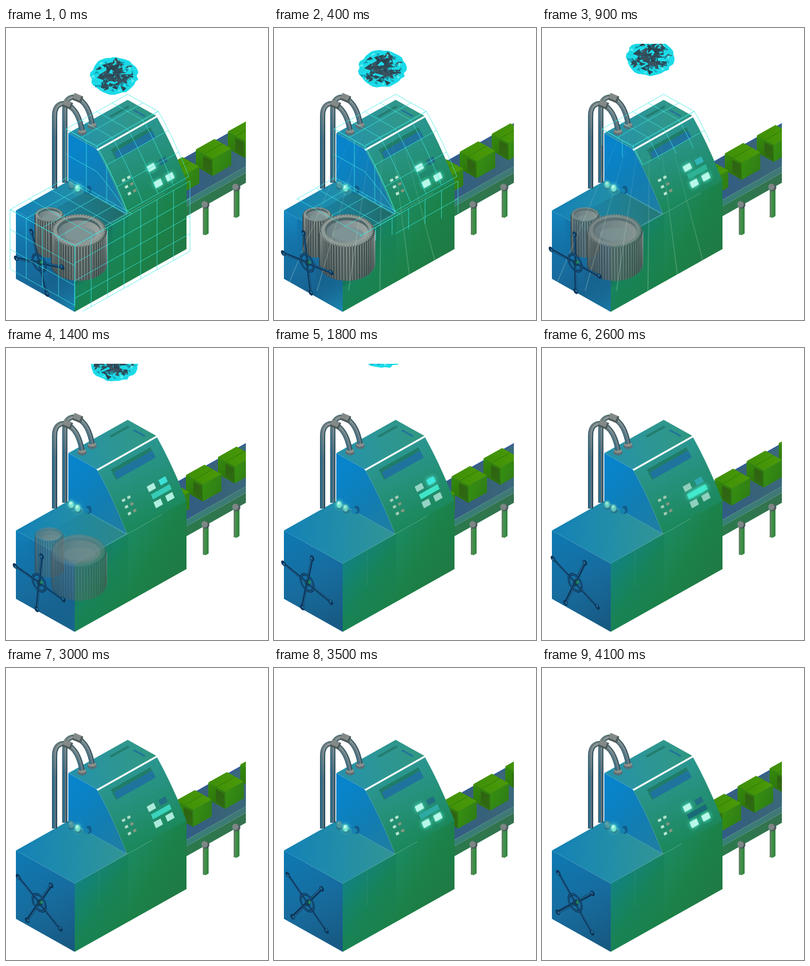
An HTML page with a canvas that plays this animation: 450x500 px, repeating every 4.2 s.

```html
<!DOCTYPE html>
<html>
<head>
<meta charset="utf-8">
<style>
html, body { margin: 0; width: 100%; height: 100%; overflow: hidden; background: #fff; }
canvas { display: block; }
</style>
</head>
<body>
<canvas id="stage" width="450" height="500"></canvas>
<script>
const c = document.getElementById('stage').getContext('2d');
const LOOP = 4200, STEP = 100;
const { PI, sin, cos, min, max } = Math;

// Isometric space: x runs right, y runs left, z up from the front corner
const p = (x, y, z) => [118 + x - y, 369 - .56 * (x + y) - z];
// Side profile of the cabinet: curved front, flat top
const height = y => min(82, y * (1.95 - .0072 * y));
const skin = (x, y) => p(x, y, height(y));

const ramp = (t, from, to) => max(0, min(1, (t - from) / (to - from)));
const range = (n, f) => Array.from({ length: n }, (_, i) => f(i));

// Piecewise linear value through time/value pairs
function at(t, ...k) {
  let v = k[1];
  for (let i = 2; i < k.length; i += 2) v += (k[i + 1] - k[i - 1]) * ramp(t, k[i - 2], k[i]);
  return v;
}

function random(seed) {
  return () => (seed = seed * 16807 % 2147483647) / 2147483647;
}

function grad(a, b, colors) {
  const g = c.createLinearGradient(...a, ...b);
  colors.forEach((col, i) => g.addColorStop(i / (colors.length - 1), col));
  return g;
}

function trace(pts) {
  c.beginPath();
  pts.forEach(q => c.lineTo(...q));
}
function fill(pts, color) {
  trace(pts);
  c.fillStyle = color;
  c.fill();
}
function line(pts, color, width = 1) {
  trace(pts);
  c.strokeStyle = color;
  c.lineWidth = width;
  c.stroke();
}
function oval(x, y, rx, ry, color) {
  c.beginPath();
  c.ellipse(x, y, rx, ry, 0, 0, 2 * PI);
  c.fillStyle = color;
  c.fill();
}
function saved(draw) {
  c.save();
  draw();
  c.restore();
}

// Quad shaded from its first corner to the opposite one
const face = (pts, colors) => fill(pts, grad(pts[0], pts[2], colors));
const leftFace = (x, y0, y1, z0, z1, colors) =>
  face([p(x, y1, z1), p(x, y0, z1), p(x, y0, z0), p(x, y1, z0)], colors);
const rightFace = (y, x0, x1, z0, z1, colors) =>
  face([p(x0, y, z1), p(x1, y, z1), p(x1, y, z0), p(x0, y, z0)], colors);
const topFace = (z, x0, x1, y0, y1, colors) =>
  face([p(x0, y1, z), p(x1, y1, z), p(x1, y0, z), p(x0, y0, z)], colors);

// Rectangle lying on the cabinet skin
const patch = (x0, x1, y0, y1, color) =>
  fill([skin(x0, y1), skin(x1, y1), skin(x1, y0), skin(x0, y0)], color);

function carton(x) {
  leftFace(x, 0, 29, -17, 12, ['#348b0c', '#2b6c0b']);
  rightFace(0, x, x + 32, -17, 12, ['#368f10', '#2f7d16']);
  topFace(12, x, x + 32, 0, 29, ['#3f8f08', '#4a9a08']);
  leftFace(x, 2, 16, -14, 8, ['#2f6212', '#2f6a12']);
  line([p(x, 15, 12), p(x + 32, 15, 12)], '#2f7a06');
}

function leg(x) {
  const [px, py] = p(x, -14, -43);
  fill([[px - 3, py], [px + 7, py], [px + 7, py + 49], [px + 2, py + 52], [px - 3, py + 51]],
    grad([px - 3, py], [px + 7, py], ['#66806a', '#3e9146', '#2f8140']));
  oval(px + 2, py, 6.5, 6.5, '#4b5b5c');
  oval(px, py - 1, 5.5, 5.5, '#7c8784');
}

function conveyor(d) {
  saved(() => {
    c.beginPath();
    c.rect(0, 0, 412, 500);
    c.clip();
    topFace(-17, 170, 360, -14, 52, ['#2c5791', '#386278', '#3f7482']);
    line([p(170, 51, -17), p(360, 51, -17)], '#335c9c', 2);
    rightFace(-14, 170, 300, -28, -17, ['#368076', '#427675']);
    rightFace(-14, 170, 300, -45, -28, ['#2a7a4c', '#35704f']);
    for (let i = 2; i >= -1; i--) carton(237 - d + 55 * i);
    [209, 262].forEach(leg);
  });
}

function machine() {
  const profile = range(35, i => 101 - i * 101 / 34);
  leftFace(0, 0, 101, -117, 0, ['#0d7ab3', '#176c9e', '#17567e']);
  rightFace(0, 0, 92, -117, 0, ['#118381', '#188358', '#1b8149']);
  rightFace(0, 92, 192, -117, 0, ['#1c8a62', '#1b8148', '#207944']);
  topFace(0, 0, 90, 0, 101, ['#1381b7', '#218da9', '#329594']);
  fill([p(90, 101, 0), ...profile.map(y => skin(90, y))], grad(p(90, 101, 40), p(90, 0, 0), ['#0784cb', '#127db2', '#217f9f']));
  topFace(82, 90, 192, 52, 101, ['#2491ae', '#2d9695', '#319781']);
  const curve = profile.filter(y => y < 53);
  fill([...curve.map(y => skin(90, y)), ...curve.reverse().map(y => skin(192, y))],
    grad([200, 180], [255, 292], ['#2b9692', '#259078', '#1b885b']));
  line([p(42, 0, 0), p(42, 0, -62)], 'rgba(66,160,112,.4)');
  // Hatch, display slot and a dent at the cabinet foot
  patch(151, 183, 88, 92, '#237d70');
  patch(180, 183, 61, 80, '#22749a');
  patch(108, 176, 37, 46, '#1f7c68');
  patch(110, 176, 37, 43, '#1f749e');
  oval(142, 277, 5, 7, '#125c8b');
  oval(138, 279, 5, 5, '#1682ae');
}

function pipe(x, y, bottom) {
  const path = new Path2D(`M${x} ${bottom}V${y + 20}C${x} ${y - 4} ${x + 20} ${y - 5} ${x + 30} ${y + 7}Q${x + 42} ${y + 18} ${x + 47} ${y + 45}`);
  const tint = (a, b) => grad([x, y], [x, y + 60], [a, b]);
  oval(x + 47, y + 49, 8, 5, '#596f75');
  oval(x + 47, y + 46, 7, 4, '#8b8f8b');
  [[tint('#3e626c', '#2c4a58'), 9, 0], [tint('#6d7d80', '#2f6e8c'), 6, -.5], [tint('#9a9d98', '#667379'), 2, 1]]
    .forEach(([color, width, shift]) => saved(() => {
      c.translate(shift, 0);
      c.strokeStyle = color;
      c.lineWidth = width;
      c.stroke(path);
    }));
  saved(() => {
    c.translate(x + 22, y + 1);
    c.rotate(.4);
    c.fillStyle = '#4b5758';
    c.fillRect(-8, -6, 16, 12);
    c.fillStyle = '#838a87';
    c.fillRect(-8, -6, 13, 9);
  });
}

function key(x, y, w, h, level, on, off) {
  const area = [x - w, x + w, y - h, y + h];
  patch(...area, off);
  saved(() => {
    c.globalAlpha = level;
    c.shadowColor = '#5affea';
    c.shadowBlur = level > .95 ? 7 : 0;
    patch(...area, on);
  });
}

function bulb(x, y, level) {
  oval(x + 1, y + 5, 6, 4, '#246f87');
  oval(x, y, 5, 6.5, '#417f91');
  saved(() => {
    c.globalAlpha = level;
    c.shadowColor = '#6fffdc';
    c.shadowBlur = 8 * level;
    oval(x, y, 4.5, 6, '#79e5d3');
    oval(x - 1, y - 2, 2, 2.5, '#d0fff3');
  });
}

function lights(t) {
  const bar = sin(PI * ramp(t, 400, 4100));
  const corner = sin(PI * ramp(t, 400, 3000));
  const main = 1 - .5 * bar ** 6;
  for (let i = 0; i < 4; i++) {
    const x = 151 + 20 * (i % 2), y = i < 2 ? 7.5 : 19.3;
    if (i < 3) key(x, y, 6, 2.1, main, '#b9f8e9', '#4a8c78');
    else key(x, y, 6, 2.1, corner, '#3deadb', '#216f83');
  }
  key(162, 13.3, 16, 1.8, bar, '#42edcd', t < 1000 ? '#208a70' : '#196b78');
  for (let i = 0; i < 6; i++) {
    const lit = i % 2 === 0 || i === 5;
    key(105 + 9 * (i % 2), 11 + 5 * (i >> 1), 2.5, .9, lit ? .9 * main : 0, '#b4efda', '#84987f');
  }
  bulb(112, 268, .1 + .8 * corner);
  bulb(123, 274, 1 - .75 * bar ** 6);
}

function gear(x, y, rx, ry, h, teeth) {
  const rim = (a, r = 1, drop = 0) => [x + rx * r * cos(a), y + ry * r * sin(a) + drop];
  c.beginPath();
  c.ellipse(x, y, rx, ry, 0, PI, 0);
  c.ellipse(x, y + h, rx, ry, 0, 0, PI);
  c.fillStyle = grad([x - rx, y], [x + rx, y], ['#3d4b50', '#6f7a78', '#3f5850']);
  c.fill();
  for (let a = 0; a <= PI; a += 2 * PI / teeth) {
    const [px, py] = rim(a);
    line([[px, py], [px, py + h]], '#3b4748', 1.8);
    line([[px + 1.6, py], [px + 1.6, py + h]], grad([px, py], [px, py + h], ['#a5aca7', '#5f706f']), .9);
  }
  fill(range(teeth * 4, i => rim(i * PI / teeth / 2, i % 4 < 2 ? 1 : .92)), '#8d9995');
  oval(x, y - 1, rx * .8, ry * .78, '#4f6669');
  oval(x + 1, y + 2, rx * .77, ry * .7, grad([x - rx, y], [x + rx, y], ['#637a7f', '#a2a9a4']));
  oval(x + 2, y + 6, rx * .58, ry * .42, '#7d9394');
}

function gears(t) {
  saved(() => {
    c.globalAlpha = 1 - ramp(t, 500, 1800);
    leftFace(0, 78, 101, -90, 0, ['rgba(28,150,205,.6)', 'rgba(20,100,150,0)']);
    leftFace(0, 0, 45, -117, -65, ['rgba(20,70,110,.2)', 'rgba(26,160,205,.7)']);
    rightFace(0, 0, 65, -75, 0, ['rgba(18,60,70,.6)', 'rgba(20,120,80,0)']);
    topFace(0, 5, 88, 2, 70, ['rgba(20,90,120,.1)', 'rgba(18,77,72,.6)']);
    gear(74, 319, 24, 12, 62, 34);
    gear(125, 347, 47, 28, 58, 58);
  });
}

function wheel(d) {
  saved(() => {
    c.transform(.866, .5, 0, 1, 57, 402);
    c.rotate((161.5 + 1.43 * d) * PI / 180);
    c.lineCap = 'round';
    for (let i = 0; i < 4; i++) {
      c.rotate(PI / 2);
      line([[0, 0], [48, 0]], '#0d355b', 4.5);
      line([[0, -1], [47, -1]], '#257099', 1.2);
      oval(48, 0, 4.6, 4.3, '#0e3559');
      oval(47, -1, 2, 2, '#25749e');
    }
    [['#0e355a', 4], ['#1c6590', 1.1]].forEach(([color, width]) =>
      line(range(41, i => [13 * cos(i * PI / 20), 13 * sin(i * PI / 20)]), color, width));
  });
  oval(58, 402, 5, 6, '#123e58');
  oval(61, 401, 2.3, 3, '#218556');
}

// Lattice over a surface given for u and v from 0 to 1
function mesh(f, n, m) {
  const wire = g => line(range(13, i => g(i / 12)), '#3ce9e5');
  for (let i = 0; i <= n; i++) wire(v => f(i / n, v));
  for (let i = 0; i <= m; i++) wire(u => f(u, i / m));
}

function wires(t) {
  const y = at(t, 0, 505, 400, 367, 900, 237, 1400, 100);
  saved(() => {
    trace([[0, 0], [450, 0], [450, y - 95], [165, y], [0, y - 96]]);
    c.clip();
    c.globalAlpha = .75;
    mesh((u, v) => p(0, 111 * u, -4 - 102 * v), 4, 3);
    mesh((u, v) => p(98 * u, 111 * v, -4), 3, 4);
    mesh((u, v) => p(198 * u, 0, -4 - 120 * v), 7, 4);
    mesh((u, v) => p(90, 105 * u, v * (height(105 * u) + 5)), 3, 2);
    const shell = (u, depth) => p(90 + 106 * u, depth, height(depth) + 5);
    mesh((u, v) => shell(u, 52.5 + 52.5 * v), 4, 2);
    mesh((u, v) => shell(u, 52.5 * v), 4, 3);
  });
}

function rays(t) {
  const a = .25 * ramp(t, 0, 300) * (1 - ramp(t, 900, 1400));
  saved(() => {
    trace([p(0, 101, 0), p(90, 101, 82), p(192, 101, 82), p(192, 0, 0), p(192, 0, -117), p(0, 0, -117), p(0, 101, -117)]);
    c.clip();
    const beam = grad([0, 150], [0, 420], ['rgba(210,240,220,0)', `rgba(210,240,220,${a})`]);
    for (let i = 0; i < 6; i++) line([[186, 60], [20 + i * 54, 450]], beam, 1.6);
  });
}

function crystal(t) {
  const s = t / 1000, y = 82 - 26 * s - 10 * s * s;
  const rnd = random(417);
  const spot = (a, r) => [186 + 42 * r * cos(a + s * .6), y + 33 * r * sin(a + s * .6)];
  const shards = (n, near, far, size, colors) => {
    for (let i = 0; i < n; i++) {
      const [px, py] = spot(i * 2.4, near + (far - near) * rnd());
      const tri = range(3, k => {
        const b = k * 2.1 + rnd() * 1.5 + i, r = size * (.5 + rnd());
        return [px + r * cos(b), py + r * .8 * sin(b)];
      });
      fill(tri, colors[i % colors.length]);
    }
  };
  saved(() => {
    c.beginPath();
    c.rect(0, 27, 450, 120);
    c.clip();
    fill(range(36, i => spot(i * PI / 18, .91 + rnd() * .1)), '#1bdbe8');
    shards(40, .1, .78, 9, ['#2a4351', '#3b5361', '#2d4957', '#324d5a']);
    shards(14, .2, .7, 4, ['#22cdd8', '#1a8fa3']);
    shards(24, .72, .88, 4, ['#20d3df', '#169eb5', '#63eef0']);
  });
}

function draw(now) {
  const t = Math.floor(now % LOOP / STEP) * STEP;
  const d = at(t, 0, 0, 400, 7, 1400, 17, 4100, 45);
  c.fillStyle = '#fff';
  c.fillRect(0, 0, 450, 500);
  conveyor(d);
  machine();
  pipe(101, 119, 265);
  pipe(83.5, 130, 275);
  gears(t);
  rays(t);
  wheel(d);
  lights(t);
  wires(t);
  crystal(t);
}

const begin = performance.now();
function tick() {
  draw(performance.now() - begin);
  requestAnimationFrame(tick);
}
tick();
</script>
</body>
</html>
```
